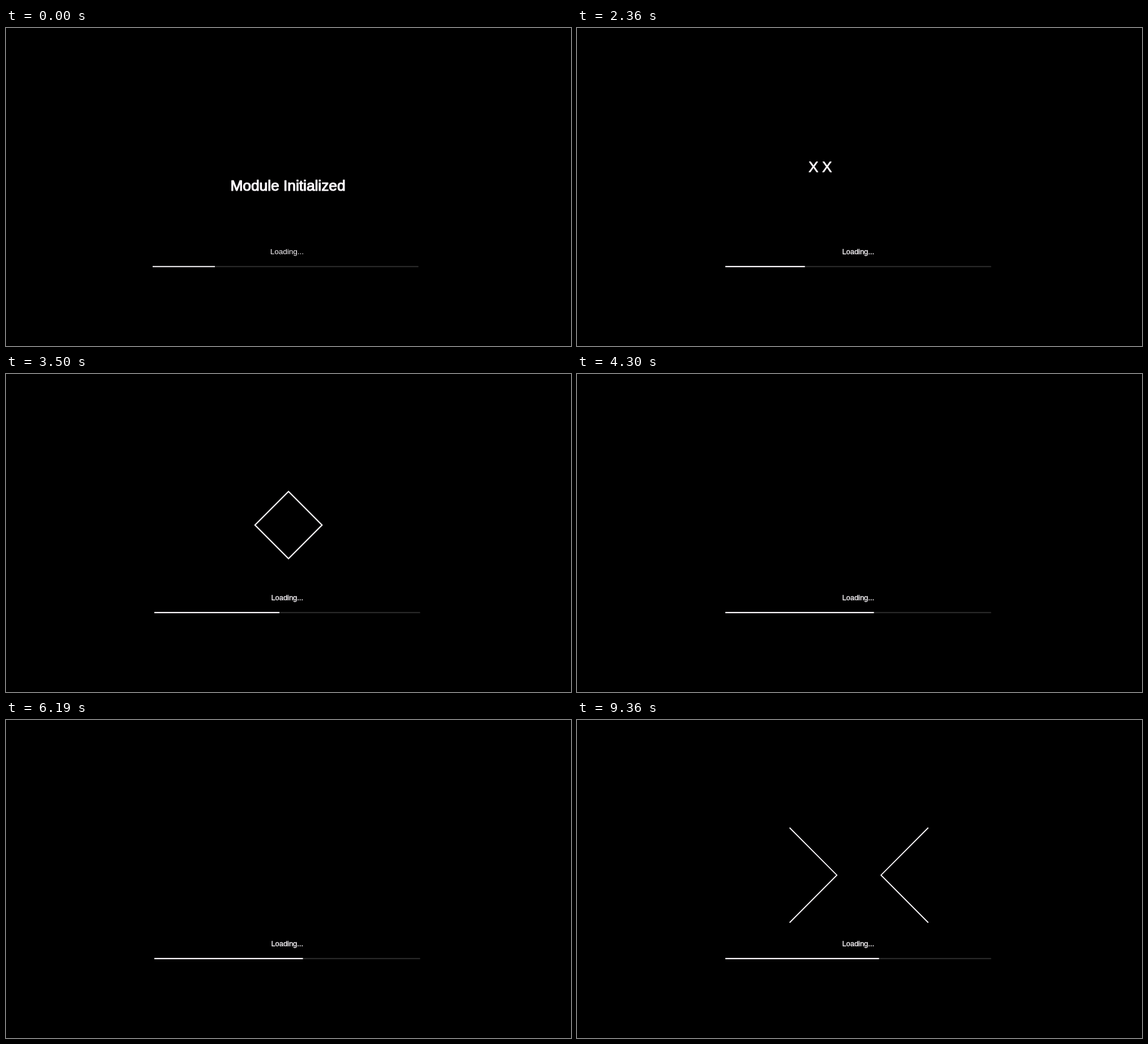
An HTML page with a canvas that plays this animation: 998x561 px, repeating every 9400 ms.

```html
<!DOCTYPE html>
<html lang="en">
<head>
<meta charset="utf-8">
<title>Loading</title>
<style>
html, body { margin: 0; width: 100%; height: 100%; overflow: hidden; background: #000; }
canvas { display: block; width: 998px; height: 561px; }
</style>
</head>
<body>
<canvas id="stage" width="998" height="561"></canvas>
<script>
const ctx = document.getElementById('stage').getContext('2d');
const LOOP = 9400;
const FONT = '"Liberation Sans", Arial, sans-serif';
const WHITE = '#fefbff';
const CX = 499, CY = 266.5;

// Time and right edge of the progress bar; equal times make a jump.
const PROGRESS = [
  [0, 369], [30, 369], [970, 385], [1200, 391], [1600, 401], [2100, 401],
  [2360, 402.5], [2960, 421], [3060, 425], [3360, 444], [3500, 444],
  [3500, 483], [3700, 483], [4100, 505], [4300, 505], [4300, 524.5],
  [7090, 524.5], [7090, 529], [9190, 529], [9190, 533.5], [LOOP, 533.5]
];

const clamp = v => Math.max(0, Math.min(1, v));
const mix = (a, b, p) => a + (b - a) * p;
const span = (t, a, b) => clamp((t - a) / (b - a));
const easeOut = p => 1 - (1 - p) ** 3;
const within = (t, a, b) => t >= a && t < b;

function noise(n) {
  const s = Math.sin(n * 127.1 + 11.7) * 43758.5453;
  return s - Math.floor(s);
}

function progressAt(t) {
  for (let i = PROGRESS.length - 1; i >= 0; i--) {
    const [a, x] = PROGRESS[i];
    if (t < a) continue;
    const next = PROGRESS[i + 1];
    return next ? mix(x, next[1], span(t, a, next[0])) : x;
  }
}

function box(x0, y0, x1, y1, color = WHITE) {
  if (x1 <= x0) return;
  ctx.fillStyle = color;
  ctx.fillRect(x0, y0, x1 - x0, y1 - y0);
}

// The thin outline gives the letters a medium weight.
function label(text, x, y, size, edge = 0) {
  ctx.font = `${size}px ${FONT}`;
  ctx.fillStyle = ctx.strokeStyle = WHITE;
  ctx.fillText(text, x, y);
  if (edge) {
    ctx.lineWidth = edge;
    ctx.lineJoin = 'round';
    ctx.strokeText(text, x, y);
  }
}

function path(points, width, close) {
  ctx.beginPath();
  points.forEach(([x, y]) => ctx.lineTo(x, y));
  if (close) ctx.closePath();
  ctx.strokeStyle = WHITE;
  ctx.lineWidth = width;
  ctx.lineJoin = 'miter';
  ctx.stroke();
}

function diamond(r) {
  path([[CX, CY - r], [CX + r, CY], [CX, CY + r], [CX - r, CY]], 2.2, true);
}

function cross(col, row) {
  label('X', 408.9 + col * 24, 253.7 + (row - 1) * 30.5, 26, 0.8);
}

function grid(shown) {
  for (let i = 0; i < 32; i++) if (shown(i)) cross(i % 8, i >> 3);
}

function footer(t) {
  const early = t < 1600;
  const left = early ? 259 : 262;
  if (early) label('Loading...', 466.8, 398.5, 13.5);
  else label('Loading...', 468.4, 398.5, 12.9, 0.35);
  box(left, 419.8, left + 469.5, 422, '#292929');
  box(left, 419.8, progressAt(t), 422, early ? '#e2e0e3' : WHITE);
}

function intro(t) {
  if (t < 400) label('Module Initialized', 396.4, 287, 26.3, 1.2);
  if (within(t, 400, 680)) diamond(mix(60, 86, easeOut(span(t, 400, 680))));
}

// Four stacked rows that grow from the left and then close to the right.
function stack(t) {
  for (let i = 0; i < 4; i++) {
    const y = 205.5 + i * 30.7;
    const grow = easeOut(span(t, 680 + i * 40, 850 + i * 40));
    const shut = span(t, 1007 + i * 120, 1267 + i * 120);
    box(mix(396, 603.5, shut), y, mix(396, 603.5, grow), y + 25.7);
  }
}

// Three uneven rows that sweep over the diamond.
function sweep(t) {
  const grow = easeOut(span(t, 2800, 2950));
  const shut = span(t, 2995, 3030);
  [[414, 612.5], [472.5, 646.5], [439.5, 638.5]].forEach(([a, b], i) => {
    const y = 232.5 + i * 30.3;
    const right = mix(405, b, grow);
    const left = mix(mix(405, a, grow), b, shut);
    if (i === 1) box(left - 5, 263.5, left, 268, '#99979a');
    box(left, y, right, y + 26);
  });
}

function chevrons() {
  for (const s of [-1, 1]) {
    const tip = 498 + s * 39, end = 498 + s * 122.5;
    path([[end, 190], [tip, 273.7], [end, 357.5]], 1.8);
  }
}

function draw(t) {
  box(0, 0, 998, 561, '#000');
  footer(t);
  intro(t);
  if (within(t, 680, 1600)) stack(t);

  if (within(t, 2100, 2740)) {
    const count = Math.min(8, 1 + Math.floor((t - 2100) / 140));
    for (let i = 0; i < count; i++) cross(i, 1);
  }
  if (within(t, 2740, 4100)) diamond(mix(59.2, 119, span(t, 3700, 4100)));
  if (within(t, 2800, 3030)) sweep(t);
  if (within(t, 3060, 3360)) {
    const step = Math.floor((t - 3060) / 33);
    grid(i => noise(i + step * 37) < 0.25 * (1 - step / 10));
  }

  if (within(t, 4790, 5860)) {
    const fill = (Math.floor(span(t, 4790, 4990) * 4) + 1) / 5;
    const clear = Math.ceil(span(t, 5130, 5860) * 19) / 19;
    grid(i => noise(i) < fill && noise(i + 50) >= clear);
  }
  if ([6060, 7090, 8090].some(a => within(t, a, a + 130))) {
    label('X', 581.5, 364, 26, 0.8);
  }
  if (t >= 9360) chevrons();
}

const start = performance.now();
function frame() {
  draw((performance.now() - start) % LOOP);
  requestAnimationFrame(frame);
}
frame();
</script>
</body>
</html>
```
